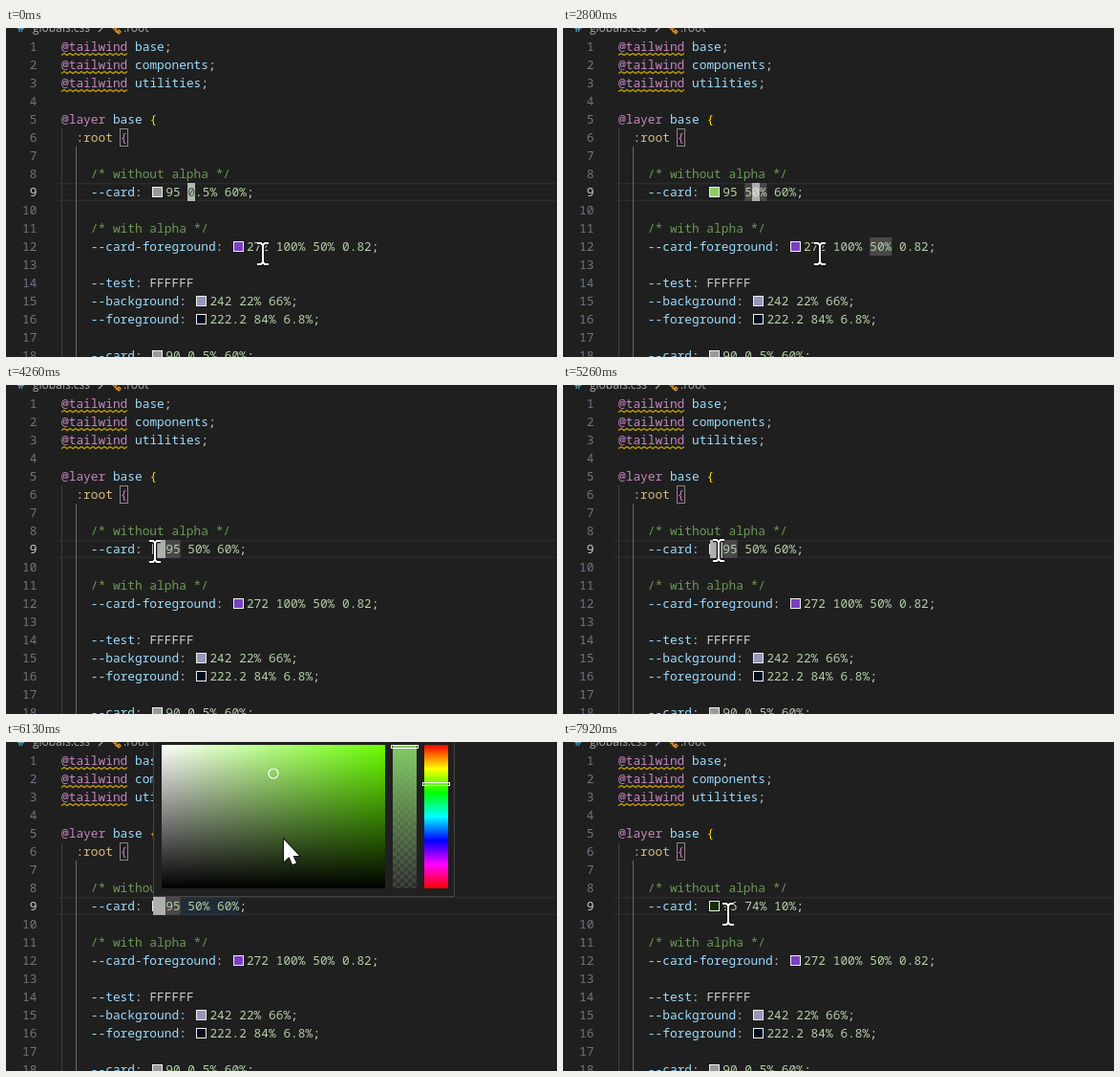
Recreate the animation shown at these times as an HTML page with a canvas. Size 577x344 px, loop 8000 ms.

```html
<!DOCTYPE html>
<html lang="en">
<head>
<meta charset="utf-8">
<title>Editing a colour in a stylesheet</title>
<style>
  html, body { margin: 0; width: 100%; height: 100%; overflow: hidden; background: #1f1f1f; }
  canvas { display: block; }
</style>
</head>
<body>
<canvas id="stage" width="577" height="344"></canvas>
<script>
const ctx = document.getElementById('stage').getContext('2d', { alpha: false });
const LOOP = 8000, TICK = 1000 / 15;
const LEFT = 58, CHAR = 7.7, ROW = 19;
const CODE_FONT = '12.83px "Noto Sans Mono", monospace';
const VALUE_X = 167.2;               // first digit after the swatch in row 9
const rowTop = row => row * ROW - 9;
const valueX = col => VALUE_X + col * CHAR;

// "▢" stands for a colour swatch
const code = [
  ['@tailwind base;'], ['@tailwind components;'], ['@tailwind utilities;'], [''],
  ['@layer base {'], ['  :root {'], [''],
  ['    /* without alpha */'], [''], [''],
  ['    /* with alpha */'],
  ['    --card-foreground: ▢272 100% 50% 0.82;', '#7940c0'], [''],
  ['    --test: FFFFFF'],
  ['    --background: ▢242 22% 66%;', 'hsl(242 22% 66%)'],
  ['    --foreground: ▢222.2 84% 6.8%;', 'hsl(222 84% 6.8%)'], [''],
  ['    --card: ▢90 0.5% 60%;', 'hsl(90 0.5% 60%)'],
];

const tokens = [
  [/^\/\*.*\*\//, '#6a9955'], [/^@\w+/, '#c586c0'], [/^--[\w-]+/, '#9cdcfe'],
  [/^:root/, '#d7ba7d'], [/^[\d.]+%?/, '#b5cea8'], [/^[a-z]+/, '#9cdcfe'],
  [/^[A-Z]+/, '#cccccc'], [/^./, '#cccccc'],
];

// Timed states: [start, ...values]
const values = [[0, '0.5% 60%'], [1130, '.5% 60%'], [1330, '5% 60%'], [1940, '50% 60%'], [6730, '74% 10%']];
const swatches = [[0, 'hsl(95 0.5% 60%)'], [1400, 'hsl(95 5% 60%)'], [2000, 'hsl(95 50% 60%)'], [6730, 'hsl(95 74% 10%)']];
const carets = [
  [0, 'block', 3], [130, 'block', 4], [660], [990, 'block', 3], [1470, 'block', 4],
  [1670, 'bar', 4], [1940, 'bar', 5], [2470, 'block', 4], [3070], [3600, 'block', 4],
  [4000, 'swatch'], [4460], [4990, 'swatch'], [5530], [5990, 'swatch'], [6460],
  [6730, 'swatch'], [7250],
];
// Highlighted words: [start, end, row, x, characters]
const highlights = [
  [400, 990, 9, valueX(3), 4], [400, 990, 18, valueX(3), 4],
  [2200, 2470, 9, valueX(3), 3], [2200, 2470, 12, 321.2, 3],
  [2800, 4000, 9, valueX(3), 3], [2800, 4000, 12, 321.2, 3],
  [4260, 6730, 9, VALUE_X, 2],
];
const pointerPath = [
  [0, 269, 236, 'beam'], [3066, 269, 236, 'beam'], [3133, 274, 211, 'beam'], [3200, 274, 211, 'beam'],
  [3600, 165, 180, 'hand'], [3666, 160, 178, 'hand'], [3800, 157, 180, 'hand'], [3867, 157, 180, 'hand'],
  [4000, 147, 167, 'beam'], [4066, 156, 174, 'beam'], [4400, 156, 174, 'beam'],
  [4466, 157, 180, 'hand'], [4933, 157, 180, 'hand'], [5000, 161, 171, 'beam'],
  [5200, 161, 171, 'beam'], [5266, 163, 173, 'beam'], [5333, 160, 177, 'hand'],
  [5667, 160, 177, 'hand'], [5799, 200, 150, 'arrow'], [6133, 291, 102, 'arrow'],
  [6466, 362, 126, 'arrow'], [7000, 362, 126, 'arrow'], [7199, 342, 158, 'beam'],
  [7333, 329, 180, 'beam'], [7733, 329, 180, 'beam'], [7800, 230, 174, 'beam'], [7866, 173, 180, 'beam'],
];
const shapes = {
  beam: new Path2D('M-6-11H-2L0-9L2-11H6M0-9V9M-6 11H-2L0 9L2 11H6'),
  hand: new Path2D('M0 1Q2-2 4 1V8Q9 7 10 9Q13 8.500 13 11Q16 10.500 16 13V18Q15 21 14 25H3Q1 20-5 14Q-5 10-1 12L0 13Z'),
  arrow: new Path2D('M0 0V23L5.500 18L9 26L13 24.500L9.500 17H16Z'),
};

const stateAt = (list, t) => list.findLast(entry => entry[0] <= t);

function rect(x, y, w, h, color) {
  ctx.fillStyle = color;
  ctx.fillRect(x, y, w, h);
}

function text(str, x, y, color, font = CODE_FONT) {
  ctx.font = font;
  ctx.fillStyle = color;
  ctx.fillText(str, x, y);
}

function outline(x, y, w, h, color) {
  ctx.lineWidth = 1;
  ctx.strokeStyle = color;
  ctx.strokeRect(x + 0.5, y + 0.5, w - 1, h - 1);
}

function drawSwatch(x, row, color) {
  const left = Math.round(x + 2.8), top = rowTop(row) + 4;
  rect(left, top, 11, 11, color);
  outline(left, top, 11, 11, '#eeeeee');
}

function drawCode(source, row, swatch) {
  let x = LEFT, rest = source;
  while (rest) {
    if (rest[0] === '▢') {
      drawSwatch(x, row, swatch);
      x += 16.8;
      rest = rest.slice(1);
      continue;
    }
    const [pattern, color] = tokens.find(([p]) => p.test(rest));
    const part = rest.match(pattern)[0];
    const brace = row === 5 ? '#ffd700' : '#da70d6';
    text(part, x, rowTop(row) + 14, part === '{' ? brace : color);
    x += part.length * CHAR;
    rest = rest.slice(part.length);
  }
}

function drawSquiggle(row) {
  const y = rowTop(row) + 16;
  ctx.beginPath();
  for (let x = LEFT; x <= 127; x += 3) ctx.lineTo(x, y + ((x - LEFT) % 6 ? 0.5 : 2.5));
  ctx.strokeStyle = '#cca700';
  ctx.lineWidth = 1.1;
  ctx.stroke();
}

function drawBreadcrumbs() {
  const font = '12px "Open Sans", sans-serif';
  text('#', 12, 4, '#519aba', 'bold 13px "Noto Sans Mono", monospace');
  text('globals.css', 28, 4, '#a9a9a9', font);
  text(':root', 123, 4, '#a9a9a9', font);
  ctx.lineWidth = 1.2;
  ctx.strokeStyle = '#a9a9a9';
  ctx.stroke(new Path2D('M97-4L101 0L97 4'));
  ctx.strokeStyle = '#ee9d28';
  ctx.stroke(new Path2D('M111-1L114-4L117-1L114 2ZM115 1V4H118M118 2L120 4L118 6L116 4Z'));
}

function drawCaret(t, line) {
  const [, kind, col] = stateAt(carets, t);
  const top = rowTop(9);
  if (kind === 'swatch') rect(154, top, 13, ROW, '#aeafad');
  if (kind === 'bar') rect(Math.round(valueX(col)) - 0.5, top, 2, ROW, '#aeafad');
  if (kind === 'block') {
    rect(Math.round(valueX(col)), top, 8, ROW, t < 130 ? '#a9bcab' : '#aeafad');
    text(line[col], valueX(col), top + 14, t < 130 ? '#515151' : '#e4e4e4');
  }
}

function gradient(x0, y0, x1, y1, stops) {
  const g = ctx.createLinearGradient(x0, y0, x1, y1);
  stops.forEach((color, i) => g.addColorStop(i / (stops.length - 1), color));
  return g;
}

function drawPicker(picked) {
  const [sat, val, color] = picked ? [0.85, 0.174, '19 44 7'] : [0.5, 0.8, '133 204 102'];
  rect(154, -2, 316, 164, '#202020');
  outline(154, -2, 316, 164, '#454545');

  rect(163, 3, 234, 150, gradient(163, 0, 397, 0, ['#fff', 'hsl(95 100% 50%)']));
  rect(163, 3, 234, 150, gradient(0, 3, 0, 153, ['rgb(0 0 0 / 0)', '#000']));
  ctx.beginPath();
  ctx.arc(163 + sat * 234, 3 + (1 - val) * 150, 5, 0, 7);
  ctx.strokeStyle = '#fff';
  ctx.lineWidth = 1.2;
  ctx.stroke();

  rect(405, 3, 25, 150, '#2b2b2b');
  for (let y = 0; y < 150; y += 4)
    for (let x = y % 8; x < 25; x += 8)
      rect(405 + x, 3 + y, Math.min(4, 25 - x), Math.min(4, 150 - y), '#3d3d3d');
  rect(405, 3, 25, 150, gradient(0, 3, 0, 153, [`rgb(${color})`, `rgb(${color} / 0)`]));
  rect(438, 3, 25, 150, gradient(0, 3, 0, 153, ['#f00', '#ff0', '#0f0', '#0ff', '#00f', '#f0f', '#f00']));
  outline(403, 3, 29, 4, '#fff');
  outline(436, 42, 29, 4, '#fff');
}

function drawPointer(t) {
  const now = Math.floor((t + 8) / TICK) * TICK;
  const i = pointerPath.findLastIndex(key => key[0] <= now + 1);
  const [t0, x0, y0, kind] = pointerPath[i];
  const [t1, x1, y1] = pointerPath[i + 1] || [t0 + 1, x0, y0];
  const k = Math.min(1, Math.max(0, (now - t0) / (t1 - t0)));
  ctx.save();
  ctx.translate(Math.round(x0 + (x1 - x0) * k), Math.round(y0 + (y1 - y0) * k));
  const shape = shapes[kind];
  ctx.strokeStyle = '#111';
  ctx.lineWidth = kind === 'beam' ? 4.5 : 2;
  ctx.stroke(shape);
  if (kind === 'beam') {
    ctx.strokeStyle = '#fff';
    ctx.lineWidth = 2;
    ctx.stroke(shape);
  } else {
    ctx.fillStyle = '#fff';
    ctx.fill(shape);
  }
  ctx.restore();
}

function draw(t) {
  const pickerOpen = t >= 5460 && t < 6730;
  const value = '95 ' + stateAt(values, t)[1] + ';';

  rect(0, 0, 577, 344, '#1f1f1f');
  drawBreadcrumbs();
  rect(53, rowTop(9), 524, 1.5, '#2b2b2b');
  rect(53, rowTop(9) + 17.5, 524, 1.5, '#2b2b2b');
  rect(58, rowTop(6), 1, 344, '#404040');
  rect(73, rowTop(7), 1, 344, '#6a6a6a');
  outline(119, rowTop(6), 9, ROW, '#888888');

  if (pickerOpen) rect(VALUE_X, rowTop(9), 10 * CHAR, ROW, 'rgb(38 79 120 / 0.25)');
  for (const [start, end, row, x, count] of highlights)
    if (t >= start && t < end) rect(x, rowTop(row), count * CHAR, ROW, '#484848');

  code.forEach(([source, swatch], i) => {
    const row = i + 1;
    ctx.textAlign = 'right';
    text(row, 32.5, rowTop(row) + 14, row === 9 ? '#cccccc' : '#6e7681');
    ctx.textAlign = 'left';
    if (row === 9) drawCode('    --card: ▢' + value, 9, stateAt(swatches, t)[1]);
    else drawCode(source, row, swatch);
    if (row < 4) drawSquiggle(row);
  });

  drawCaret(t, value);
  if (pickerOpen) drawPicker(t >= 6660);
  drawPointer(t);
}

const begin = performance.now();
function tick() {
  draw((performance.now() - begin) % LOOP);
  requestAnimationFrame(tick);
}
tick();
</script>
</body>
</html>
```
